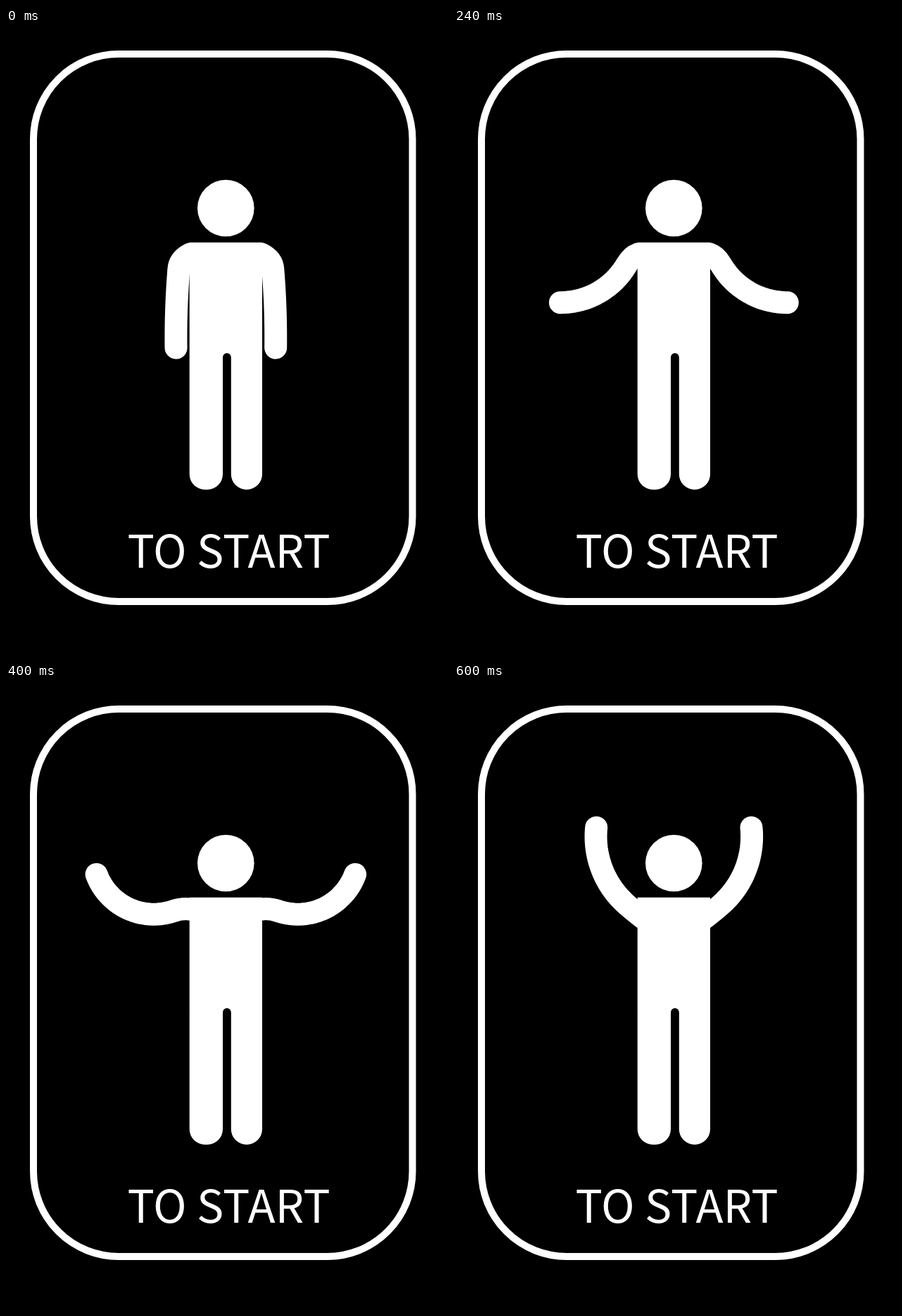
Recreate the animation shown at these times as an HTML page. Size 628 px wide and 891 px high, loop 1.64 s.

```html
<!DOCTYPE html>
<html lang="en">
<head>
<meta charset="utf-8">
<title>Arms up to start</title>
<style>
  html, body { margin: 0; width: 100%; height: 100%; overflow: hidden; background: #000; }
  svg { display: block; width: 100vw; height: 100vh; }
  text { font: 400 64.2px "Noto Sans CJK JP", "Noto Sans CJK SC", "Noto Sans CJK", "Noto Sans", sans-serif; }
</style>
</head>
<body>
<svg viewBox="0 0 628 891" fill="#fff">
  <rect width="628" height="891" fill="#000"/>
  <rect x="39" y="37" width="538.5" height="778" rx="121" fill="none" stroke="#fff" stroke-width="10"/>
  <circle cx="312.3" cy="256" r="40.3"/>
  <path d="M260.7 304.7H364V634a22 22 0 0 1-22 22h-.2a22 22 0 0 1-22-22V467.9a5.9 5.9 0 0 0-11.8 0V634a22 22 0 0 1-22 22h-3.3a22 22 0 0 1-22-22Z"/>
  <g fill="none" stroke="#fff" stroke-width="32" stroke-linecap="round" stroke-linejoin="round">
    <path id="left"/>
    <path id="right" transform="translate(624.7 0) scale(-1 1)"/>
  </g>
  <text x="316.6" y="767" text-anchor="middle">TO START</text>
</svg>
<script>
const LOOP = 1640, STEP = 40, RAISED = 600;
const SOFT = 180;   // length of the slow start, ms
const PARTS = 24;   // straight pieces in one arm

const { sin, cos, PI } = Math;
const arms = ["left", "right"].map(id => document.getElementById(id));

// Point at a distance from (x, y); 0 degrees hangs down, 90 points outward, 180 up
function move([x, y], dist, deg) {
  const a = deg * PI / 180;
  return [x - dist * sin(a), y + dist * cos(a)];
}

// Cubic start that runs into a steady lift, 0 to 1
function lift(t) {
  const done = t < SOFT ? SOFT / 3 * (t / SOFT) ** 3 : t - SOFT * 2 / 3;
  return done / (RAISED - SOFT * 2 / 3);
}

// The upper arm lifts steadily while the hand runs ahead, bending the arm
function armPath(r) {
  const hump = sin(PI * r), wave = sin(2 * PI * r);
  const base = 4 + 135 * r;
  const bend = 44 * r - 4 + 48 * hump + 4 * wave;
  const reach = 112 + 8 * r + 14 * hump ** 2 - 7 * wave;
  const angle = s => base + bend * (4 * s / 3 - 1 / 6);

  const root = [262 + 8 * r ** 6, 321 + 14 * r ** 6];
  let p = move([261, 327], 22 - 4 * wave, 45 + 83 * r - 6 * wave);
  let d = `M${root}Q${move(p, -14, angle(0))} ${p}`;
  for (let i = 0; i < PARTS; i++) {
    p = move(p, reach / PARTS, angle((i + 0.5) / PARTS));
    d += `L${p}`;
  }
  return d;
}

function draw(now) {
  const t = Math.floor((now % LOOP) / STEP) * STEP;
  const d = armPath(lift(Math.min(t, RAISED)));
  arms.forEach(arm => arm.setAttribute("d", d));
}

const start = performance.now();
function tick() {
  draw(performance.now() - start);
  requestAnimationFrame(tick);
}
tick();
</script>
</body>
</html>
```
